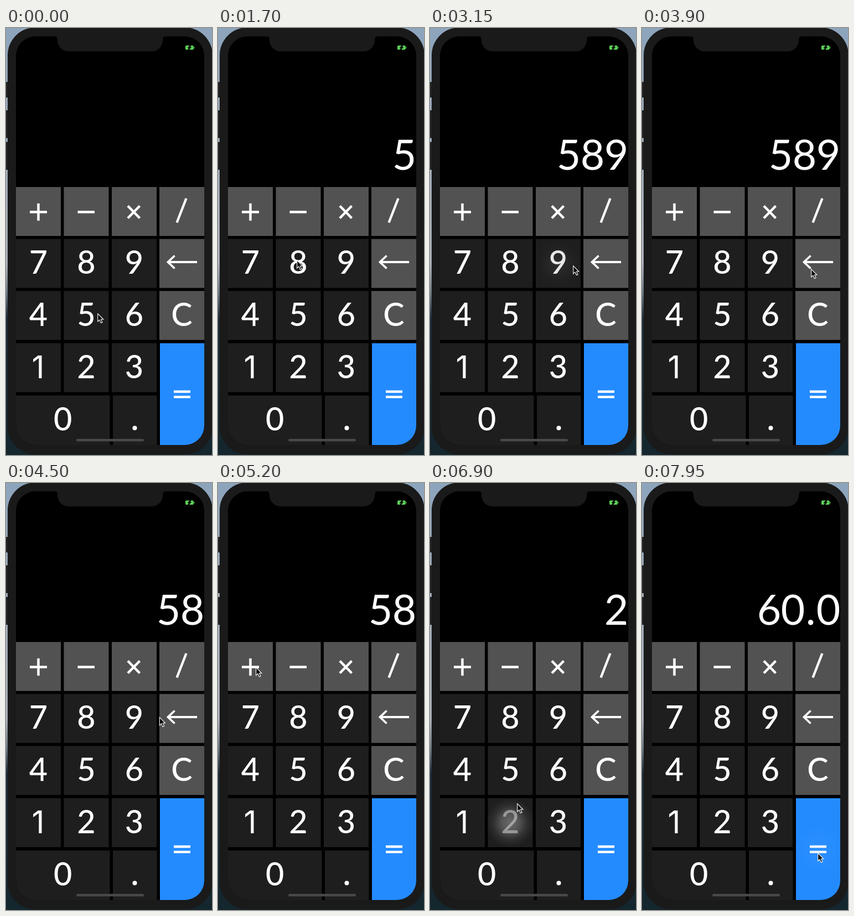
These frames come from a looping animation (372 px wide and 768 px high, 8000 ms). An HTML page with a canvas:

```html
<!DOCTYPE html>
<html lang="en">
<head>
<meta charset="utf-8">
<title>Calculator</title>
<style>
html, body { margin: 0; width: 100%; height: 100%; overflow: hidden; background: #1a1a1a; }
canvas { display: block; width: 372px; height: 768px; }
</style>
</head>
<body>
<canvas id="stage" width="372" height="768"></canvas>
<script>
const ctx = document.getElementById('stage').getContext('2d');
const LOOP = 8000, FADE = 300;
const COLS = [18, 104.5, 191, 277], ROWS = [286, 379.5, 473, 567, 661];
const GRAY = '#525252', DARK = '#1e1e1e', BLUE = '#248bff';

const key = (label, col, row, color = DARK, w = 81, h = 88) =>
  ({ label, x: COLS[col], y: ROWS[row], w, h, color });
const KEYS = [
  ...['+', '−', '×', '/'].map((s, i) => key(s, i, 0, GRAY)),
  ...['7', '8', '9'].map((s, i) => key(s, i, 1)), key('←', 3, 1, GRAY),
  ...['4', '5', '6'].map((s, i) => key(s, i, 2)), key('C', 3, 2, GRAY),
  ...['1', '2', '3'].map((s, i) => key(s, i, 3)),
  key('0', 0, 4, DARK, 169.5, 89),
  { label: '.', x: 193, y: 661, w: 79.5, h: 89, color: DARK },
  { label: '=', x: 278, y: 567, w: 80, h: 183, color: BLUE }
];

// key, touch down, touch up, readout after release
const TAPS = [
  ['5', 700, 850, '5'],
  ['8', 1850, 1980, '58'],
  ['9', 2750, 2890, '589'],
  ['←', 4000, 4130, '58'],
  ['+', 5380, 5520, '58'],
  ['2', 6680, 6820, '2'],
  ['=', 7530, 7675, '60.0']
];

// pointer: start, end, target x, target y
const MOVES = [
  [1100, 1600, 142, 417],
  [2150, 2440, 258, 427],
  [3200, 3700, 305, 433],
  [4350, 5050, 68, 331],
  [5750, 6400, 157, 576],
  [6960, 7420, 317, 665]
];

const clamp = v => Math.max(0, Math.min(1, v));
const ease = u => u * u * (3 - 2 * u);

function box(x, y, w, h, r, color) {
  ctx.fillStyle = color;
  ctx.beginPath();
  ctx.roundRect(x, y, w, h, r);
  ctx.fill();
}

function strokeLine(width, ...points) {
  ctx.lineWidth = width;
  ctx.beginPath();
  points.forEach(([x, y], i) => i ? ctx.lineTo(x, y) : ctx.moveTo(x, y));
  ctx.stroke();
}

function text(str, x, y, font) {
  ctx.font = font;
  ctx.textAlign = 'center';
  ctx.fillText(str, x, y);
}

const SYMBOLS = {
  '+'() { strokeLine(4.5, [43, 331], [74, 331]); strokeLine(4.5, [58.5, 315.5], [58.5, 346.5]); },
  '−'() { strokeLine(4.5, [129.5, 331], [160, 331]); },
  '×'() { strokeLine(4.5, [220, 320], [241.5, 342]); strokeLine(4.5, [241.5, 320], [220, 342]); },
  '/'() { strokeLine(4.3, [325.5, 306.5], [308.5, 350]); },
  '←'() {
    strokeLine(3.8, [292, 421], [345, 421]);
    strokeLine(3.8, [304.5, 409.5], [292.5, 421], [304.5, 432.5]);
  },
  '='() { strokeLine(4.3, [303, 654], [333, 654]); strokeLine(4.3, [303, 663.7], [333, 663.7]); },
  '.'() {
    ctx.beginPath();
    ctx.arc(232.5, 719.5, 4, 0, 7);
    ctx.fill();
  }
};

function drawLabel(k) {
  ctx.fillStyle = ctx.strokeStyle = '#fff';
  if (SYMBOLS[k.label]) return SYMBOLS[k.label]();
  const cx = k.x + k.w / 2, base = k.y + (k.label === '0' ? 63.3 : 62.5);
  if (k.label === '1') text('1', cx - 0.5, base, '400 56.5px Inter, sans-serif');
  else text(k.label, cx, base, '500 57.5px Lato, sans-serif');
}

function pressLevel(label, t) {
  const tap = TAPS.find(p => p[0] === label);
  if (!tap || t < tap[1]) return 0;
  return t <= tap[2] ? 1 : clamp(1 - (t - tap[2]) / FADE);
}

function drawKey(k, t) {
  ctx.fillStyle = k.color;
  ctx.fillRect(k.x, k.y, k.w, k.h);
  const p = pressLevel(k.label, t);
  if (p > 0) {
    const cx = k.x + k.w / 2, cy = k.y + k.h / 2;
    const glow = ctx.createRadialGradient(cx, cy, 0, cx, cy, 44);
    [[0, 0.46], [0.35, 0.34], [0.7, 0.1], [1, 0]].forEach(([at, a]) =>
      glow.addColorStop(at, `rgba(255,255,255,${a * p})`));
    ctx.fillStyle = glow;
    ctx.fillRect(cx - 44, cy - 44, 88, 88);
  }
  ctx.globalAlpha = 1 - 0.8 * p;
  drawLabel(k);
  ctx.globalAlpha = 1;
}

function drawReadout(t) {
  const shown = TAPS.filter(p => p[2] <= t).pop();
  if (!shown) return;
  ctx.fillStyle = '#fff';
  let right = 358;
  for (const ch of [...shown[3]].reverse()) {
    const w = ch === '.' ? 21 : 43;
    text(ch, right - w / 2, 254.5, '400 75px Lato, sans-serif');
    right -= w;
  }
}

function drawBackdrop() {
  const sky = ctx.createLinearGradient(0, 0, 0, 768);
  [[0, '#8ca4bc'], [0.25, '#9eabba'], [0.55, '#adb2bc'], [0.62, '#707b87'],
   [0.68, '#1d2b39'], [1, '#14262e']].forEach(s => sky.addColorStop(...s));
  ctx.fillStyle = sky;
  ctx.fillRect(0, 0, 372, 768);
  ctx.fillStyle = '#222';
  [[97, 28], [148, 50], [205, 50]].forEach(([y, h]) => ctx.fillRect(0, y, 4, h));
  box(3, -1, 370, 768, 50, '#1a1a1a');
}

function drawNotch() {
  ctx.fillStyle = '#1a1a1a';
  ctx.beginPath();
  ctx.moveTo(87, 14);
  ctx.lineTo(87, 15);
  ctx.quadraticCurveTo(93, 15, 93, 21);
  ctx.arcTo(93, 42, 114, 42, 20);
  ctx.lineTo(263, 42);
  ctx.arcTo(283, 42, 283, 21, 20);
  ctx.lineTo(283, 21);
  ctx.quadraticCurveTo(283, 15, 289, 15);
  ctx.lineTo(289, 14);
  ctx.fill();
}

function drawBattery() {
  box(324, 31.5, 14.5, 7.5, 1.5, '#5fd35a');
  box(339, 33.5, 1.2, 3.5, 0.5, '#5fd35a');
  ctx.strokeStyle = '#000';
  strokeLine(2.2, [333.5, 31], [329.8, 35.2], [332.8, 35.2], [329, 39.5]);
}

function pointerAt(t) {
  let x = 165, y = 513;
  for (const [start, end, tx, ty] of MOVES) {
    const u = ease(clamp((t - start) / (end - start)));
    x += (tx - x) * u;
    y += (ty - y) * u;
  }
  return [x, y];
}

function drawPointer(t) {
  ctx.save();
  ctx.translate(...pointerAt(t));
  ctx.beginPath();
  [[0.7, 0.8], [0.7, 15], [3.9, 11.9], [6.5, 17.6], [9, 16.5], [6.5, 11], [10.8, 11]]
    .forEach(([x, y]) => ctx.lineTo(x, y));
  ctx.closePath();
  ctx.fillStyle = '#000';
  ctx.strokeStyle = '#fff';
  ctx.lineWidth = 1.1;
  ctx.fill();
  ctx.stroke();
  ctx.restore();
}

function draw(t) {
  drawBackdrop();
  ctx.save();
  ctx.beginPath();
  ctx.roundRect(18, 15, 340, 735, 35);
  ctx.clip();
  ctx.fillStyle = '#000';
  ctx.fillRect(18, 15, 340, 735);
  drawReadout(t);
  KEYS.forEach(k => drawKey(k, t));
  box(127, 739, 122, 4.5, 2.2, '#494949');
  drawNotch();
  drawBattery();
  ctx.restore();
  drawPointer(t);
}

const began = performance.now();
function tick() {
  draw((performance.now() - began) % LOOP);
  requestAnimationFrame(tick);
}
tick();
</script>
</body>
</html>
```
